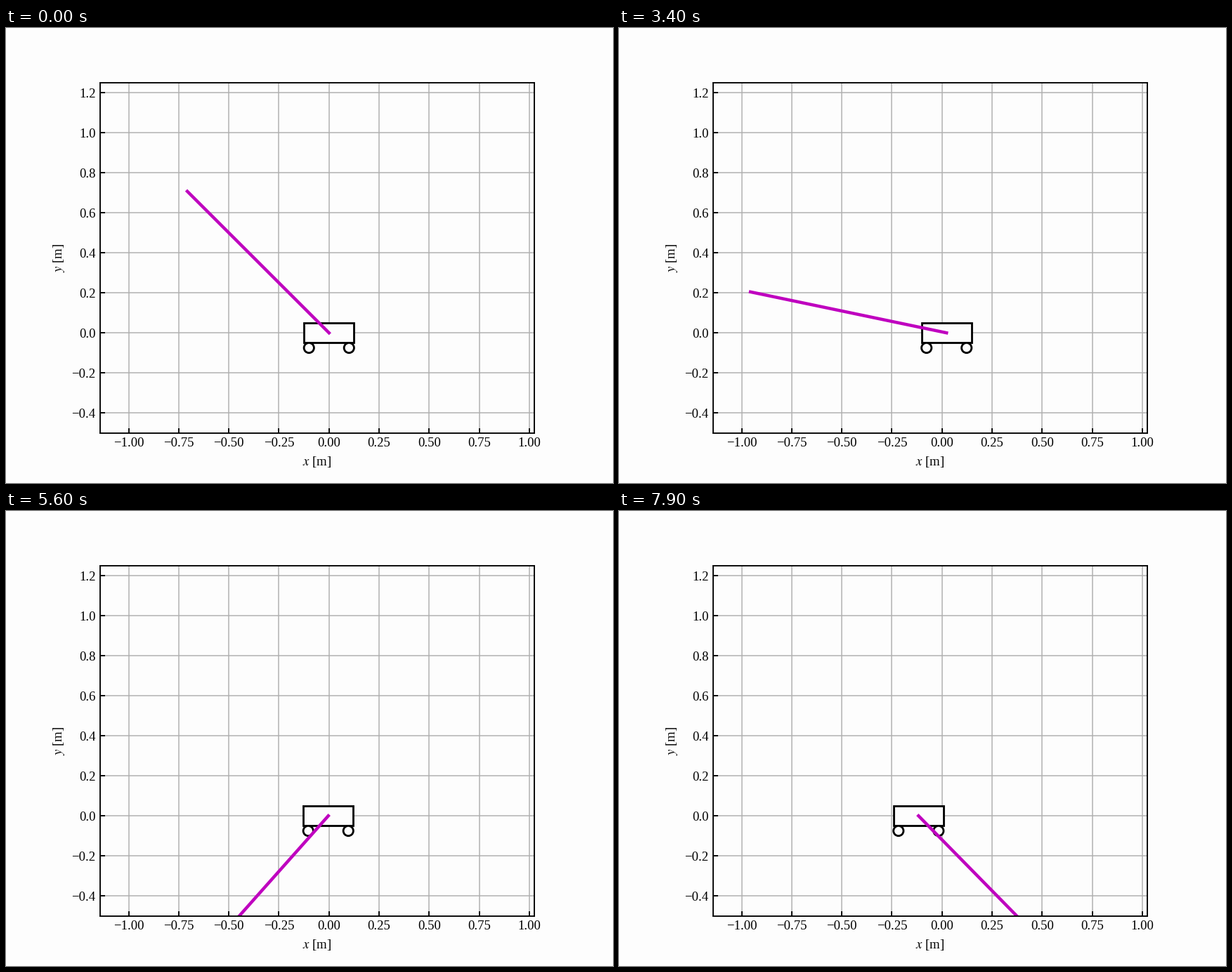
A matplotlib script for the animation above (8000 ms loop, 864 by 648 pixels).

```python
import numpy as np
import matplotlib.pyplot as plt
from matplotlib.animation import FuncAnimation
from matplotlib.patches import Circle, Rectangle

FRAMES, INTERVAL = 80, 100
STEP = 0.00898          # simulated seconds per frame
GRAVITY, LENGTH = 9.81, 1.0
CART_MASS, ROD_MASS = 1.0, 0.2
START = np.pi / 4       # rod angle, anticlockwise from upright
CART_W, CART_H, WHEEL_R, WHEEL_X = 0.25, 0.1, 0.025, 0.1
PAPER = "#fdfdfd"

# A uniform rod hinged on a free cart: total horizontal momentum stays zero.
SHIFT = 0.5 * LENGTH * ROD_MASS / (CART_MASS + ROD_MASS)
COUPLING = 1.5 * SHIFT / LENGTH


def slope(state):
    angle, speed = state
    s, c = np.sin(angle), np.cos(angle)
    accel = (1.5 * GRAVITY / LENGTH * s - COUPLING * s * c * speed**2) / (1 - COUPLING * c * c)
    return np.array([speed, accel])


def simulate():
    state, angles = np.array([START, 0.0]), []
    substeps = 4
    h = STEP / substeps
    for _ in range(FRAMES):
        for _ in range(substeps):
            k1 = slope(state)
            k2 = slope(state + h / 2 * k1)
            k3 = slope(state + h / 2 * k2)
            k4 = slope(state + h * k3)
            state = state + h / 6 * (k1 + 2 * k2 + 2 * k3 + k4)
        angles.append(state[0])
    return np.array(angles)


plt.rcParams.update({
    "font.family": "Liberation Serif",
    "mathtext.fontset": "stix",
    "font.size": 10,
    "xtick.direction": "in",
    "ytick.direction": "in",
    "axes.linewidth": 1.0,
    "xtick.major.width": 1.0,
    "ytick.major.width": 1.0,
    "axes.axisbelow": True,
    "toolbar": "None",
})

angles = simulate()
cart_x = SHIFT * (np.sin(angles) - np.sin(START))

fig = plt.figure(figsize=(6.4, 4.8), dpi=135, facecolor=PAPER)
ax = fig.add_subplot(facecolor=PAPER)
ax.set_aspect("equal")
ax.set_xlim(-1.1425, 1.0235)
ax.set_ylim(-0.5, 1.25)
ax.set_xticks(np.arange(-1, 1.01, 0.25))
ax.set_yticks(np.arange(-0.4, 1.21, 0.2))
ax.set_xlabel("$x$ [m]")
ax.set_ylabel("$y$ [m]")
ax.grid(color="#b0b0b0", linewidth=0.8)

style = dict(facecolor=PAPER, edgecolor="black", linewidth=1.5)
body = ax.add_patch(Rectangle((-CART_W / 2, -CART_H / 2), CART_W, CART_H, **style))
wheels = [ax.add_patch(Circle((0, 0), WHEEL_R, **style)) for _ in range(2)]
rod, = ax.plot([], [], color="m", linewidth=2.4)


def draw(i):
    x, angle = cart_x[i], angles[i]
    body.set_x(x - CART_W / 2)
    for wheel, side in zip(wheels, (-1, 1)):
        wheel.center = (x + side * WHEEL_X, -CART_H / 2 - WHEEL_R)
    rod.set_data([x, x - LENGTH * np.sin(angle)], [0, LENGTH * np.cos(angle)])
    return [body, *wheels, rod]


anim = FuncAnimation(fig, draw, frames=FRAMES, interval=INTERVAL, repeat=True, repeat_delay=0)
plt.show()
```
